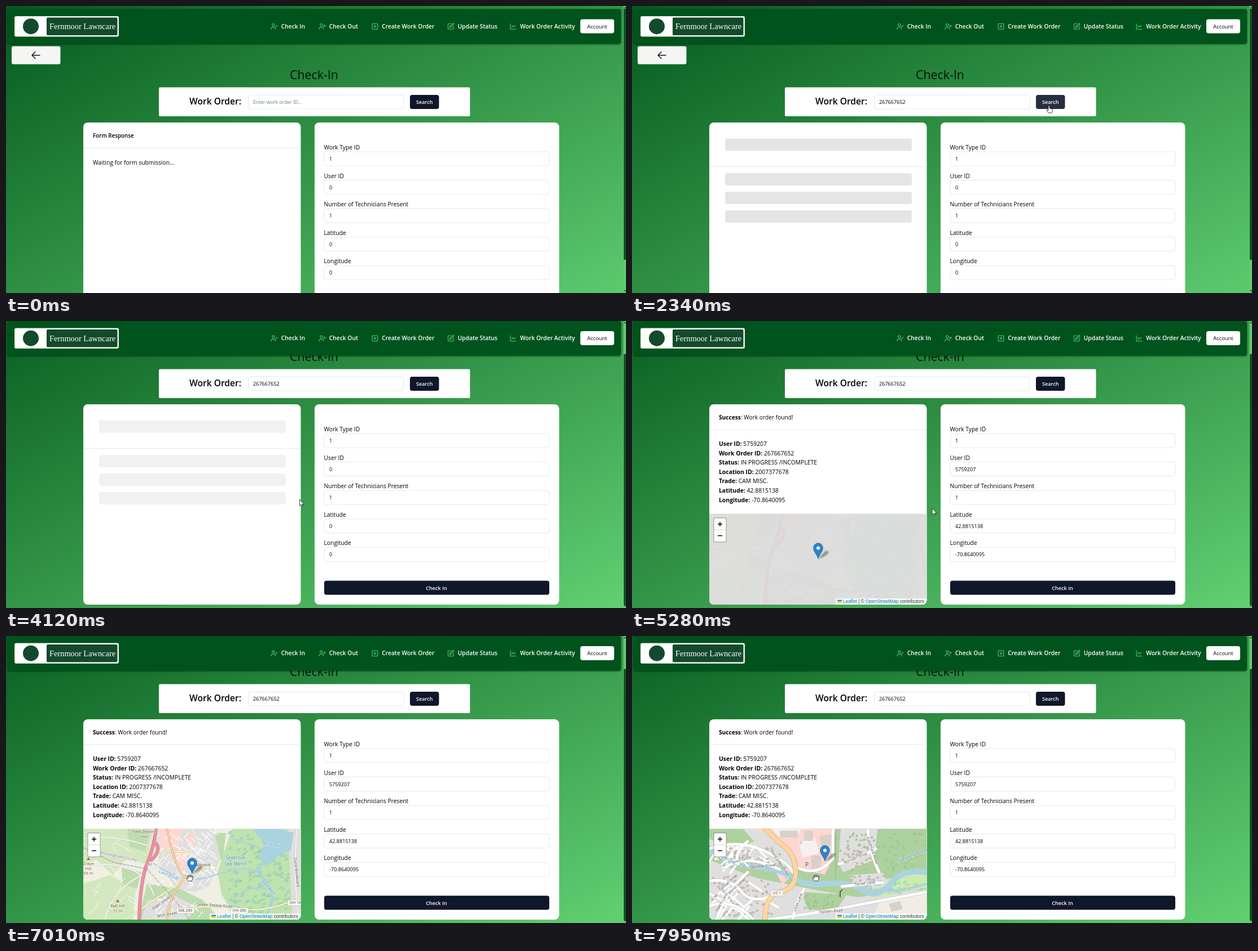
An HTML page for the animation above (8000 ms loop, 1099 px wide and 510 px high).

```html
<!DOCTYPE html>
<html lang="en">
<head>
<meta charset="utf-8">
<title>Check-In</title>
<style>
  html, body { margin: 0; width: 100%; height: 100%; overflow: hidden; background: #339548; }
  svg { display: block; font-family: "Open Sans", "Noto Sans", sans-serif; }
  text { white-space: pre; }
  .map text { text-anchor: middle; paint-order: stroke; stroke: #fff9; stroke-width: 1.6px; stroke-linejoin: round; }
  .cursor { stroke: #111; stroke-width: .8; stroke-linejoin: round; fill: #fff; }
</style>
</head>
<body>
<svg id="stage" width="1099" height="510"></svg>
<script>
const LOOP = 8000, ANCHOR = [326, 430], PIN = [4, -7.5];
const NAVY = '#0f172a', LINE = '#e2e8f0';

let seed = 11;
const rnd = () => (seed = seed * 16807 % 2147483647) / 2147483647;
const clamp = v => Math.max(0, Math.min(1, v));

// ---- drawing helpers -------------------------------------------------
const rect = (x, y, w, h, fill, r = 0, more = '') =>
  `<rect x="${x}" y="${y}" width="${w}" height="${h}" rx="${r}" fill="${fill}" ${more}/>`;
const text = (x, y, size, str, more = '') => `<text x="${x}" y="${y}" font-size="${size}" ${more}>${str}</text>`;
const area = (fill, ...ds) => ds.map(d => `<path d="${d}" fill="${fill}"/>`).join('');
const line = (stroke, width, d, more = '') =>
  `<path d="${d}" fill="none" stroke="${stroke}" stroke-width="${width}" stroke-linecap="round" stroke-linejoin="round" ${more}/>`;
const roads = (color, edge, width, ...ds) =>
  ds.map(d => line(edge, width + 1, d)).join('') + ds.map(d => line(color, width, d)).join('');
const group = (id, body, more = '') => `<g id="${id}" ${more}>${body}</g>`;
const scatter = (n, x, y, w, h, make) =>
  Array.from({ length: n }, () => make((x + rnd() * w).toFixed(1), (y + rnd() * h).toFixed(1))).join('');
const label = (x, y, str, fill = '#555', turn = 0, size = 7, more = '') =>
  text(x, y, size, str, `fill="${fill}" transform="rotate(${turn} ${x} ${y})" ${more}`);
const water = (x, y, str, turn = 0, size = 8.5) => label(x, y, str, '#3f86b4', turn, size, 'font-style="italic"');
const shield = (x, y, str) =>
  rect(x - str.length * 2.3 - 2, y - 7, str.length * 4.6 + 4, 10, '#fffc', 2, 'stroke="#bbb" stroke-width=".6"') +
  label(x, y, str, '#444');
const input = (x, y, w) => rect(x, y, w, 25, '#fff', 4, `stroke="${LINE}"`);
const button = (x, y, w, str, cx, id) =>
  rect(x, y, w, 25, NAVY, 4, `id="${id}"`) +
  text(cx, y + 16, 9.1, str, 'fill="#fff" font-weight="600" text-anchor="middle"');

// ---- navigation ------------------------------------------------------
const USER = 'M16 21v-2a4 4 0 0 0-4-4H6a4 4 0 0 0-4 4v2M13 7a4 4 0 1 1-8 0 4 4 0 0 1 8 0';
const BOX = 'M5 3H19a2 2 0 0 1 2 2V19a2 2 0 0 1-2 2H5a2 2 0 0 1-2-2V5a2 2 0 0 1 2-2M8 12h8M12 8v8';
const EDIT = 'M12 3H5a2 2 0 0 0-2 2v14a2 2 0 0 0 2 2h14a2 2 0 0 0 2-2v-7M18.4 2.6a2 2 0 0 1 3 3L12 15l-4 1 1-4Z';
const items = [
  [469, 'Check In', USER + 'M16 11l2 2 4-4'],
  [554, 'Check Out', USER + 'M17 8l5 5M22 8l-5 5'],
  [647.5, 'Create Work Order', BOX],
  [782, 'Update Status', EDIT],
  [892.5, 'Work Order Activity', 'M3 3v18h18M19 9l-5 5-4-4-3 3']
];
const nav =
  rect(3, 0, 1087, 61.5, '#00521a', 4, 'filter="url(#shade)"') +
  rect(15.5, 13, 184, 35.5, '#fff', 2, 'stroke="#e8e8e0"') +
  rect(72, 15, 125.5, 31.5, '#134a2c', 2) +
  '<circle cx="44" cy="30.7" r="14" fill="#134a2c"/>' +
  text(77, 35.5, 14.4, 'Fernmoor Lawncare', 'fill="#fff" font-family="Liberation Serif, serif"') +
  items.map(([x, str, d]) =>
    line('#5fd07a', 1.9, d, `transform="translate(${x} 24.3) scale(.54)"`) +
    text(x + 18.7, 34.4, 10.3, str, 'fill="#fff" font-weight="600"')).join('') +
  rect(1018, 18, 60, 25, '#fff', 4) +
  text(1048, 34, 9.4, 'Account', 'font-weight="500" text-anchor="middle"');

// ---- map, one layer per zoom level -----------------------------------
const hill = (x, y, a, b) =>
  area('#b5651d', `M${x} ${y - 14}l3 5h-6Z`) + label(x, y, a, '#7a4a2a') + label(x, y + 8.5, b, '#7a4a2a');
const house = (x, y) => rect(x, y, 4.5, 3.6, '#c6b9ad', 0, `transform="rotate(${(x * 7) % 50 - 25} ${x} ${y})"`);
const reed = (x, y) => line('#7fbfc4', .9, `M${x} ${y}h4m-6 2.5h5`);
const tree = (x, y) => area('#9cc58d', `M${x} ${y}l2.5 5h-5Z`);
// Side street at one of two crossing bearings
const lane = (len, width) => (x, y) => {
  const a = (rnd() < .5 ? .45 : 2.1) + rnd() * .4;
  return line('#fff', width, `M${x} ${y}l${(len * Math.cos(a)).toFixed(1)} ${(len * Math.sin(a)).toFixed(1)}`);
};

const far =
  rect(60, 300, 540, 260, '#efefe2') +
  area('#d3e8bf', 'M137 343H262L248 405 215 395 190 425 160 398 137 404Z', 'M137 440L185 425 230 450 225 504H137Z') +
  area('#bfdbb0', 'M215 343h42l-10 40-28-8Z', 'M250 440l60 10 40 20 30 34H235Z', 'M205 412l35 8-8 30-25-10Z', 'M350 350h40l-6 50-25-12Z') +
  area('#e0dfdf', 'M264 343H368L380 395 360 445 335 455 300 448 272 405Z', 'M500 343H522V504H508Z', 'M250 470l50-8 40 20-20 22h-80Z') +
  area('#ffd6d1', 'M270 343h42l-6 30-30 9Z', 'M298 378l22 4 5 28-18 4Z', 'M322 348l14 6-4 18-12-4Z') +
  area('#bfe3ad', 'M400 343H500L508 504H408L382 458 375 420 388 380Z') +
  scatter(170, 395, 346, 105, 155, reed) +
  area('#aad3df', 'M436 343H488L510 350 505 380 482 392 462 410 450 395 458 368Z') +
  line('#aad3df', 5, 'M462 400Q438 412 455 430T472 466 455 504') +
  line('#aad3df', 2.5, 'M262 404Q290 425 315 430T360 428 410 415 450 425M400 360Q430 368 455 380M410 460Q440 440 470 452') +
  scatter(95, 272, 343, 95, 98, lane(13, 1.2)) + scatter(25, 140, 350, 90, 150, lane(13, 1)) + scatter(22, 255, 455, 95, 40, lane(13, 1.2)) +
  roads('#fff', '#c9c4bc', 1.6, 'M137 412Q180 400 215 412T262 460', 'M175 504Q190 450 240 425T300 380', 'M137 360Q190 352 250 372', 'M330 343Q345 380 375 398', 'M515 343L512 420 518 504') +
  roads('#f7fabf', '#b9b98a', 2.2, 'M212 504Q260 470 310 437T372 405', 'M250 504Q300 486 340 482T420 485 522 465', 'M245 390Q290 378 330 385') +
  roads('#fcd6a4', '#c69a58', 2.6, 'M285 343Q294 385 304 408T317 427 304 448 285 504') +
  roads('#e892a2', '#d0507a', 5, 'M266 343Q262 375 250 405T236 504', 'M262 365Q278 378 258 398') +
  line('#a07ab0', 1, 'M137 376L190 402 250 414 300 470 325 504', 'stroke-dasharray="5 2"') +
  label(246, 350, 'New Zealand', '#7a4a2a') + label(246, 359, 'Hill', '#7a4a2a') +
  hill(146, 407, 'Grape', 'Hill') + label(146, 424, '69 m', '#7a4a2a') + hill(198, 482, 'Batt Hill', '51 m') +
  label(200, 394, 'Rockingham County', '#8d67a0', 12) + label(255, 408, '9d', '#666') +
  label(345, 409, 'Seabrook', '#444', 0, 8) + water(407, 397, 'Seabrook') + water(407, 408, 'Salt Marsh') +
  water(287, 427, 'Cains Brook', 22, 7) + water(470, 373, 'Mill Creek', 10, 7) + water(464, 449, 'Reed Water', 45, 7) +
  label(277, 476, 'Elder Street', '#444', -35) + label(286, 497, 'Wick Street', '#444', -10) +
  label(370, 481, 'Green Pebble Road', '#444', 4) + label(513, 420, 'Dune Boulevard', '#444', 84) +
  shield(318, 490, 'MA 286') + shield(414, 490, 'NH 286') + shield(513, 476, 'NH 1A');

const mid =
  rect(60, 300, 540, 260, '#e3e2df') +
  area('#d3e8bf', 'M137 343h40l-22 60-18 5Z', 'M185 440l70-5 20 30-50 39H165Z', 'M395 370h65l10 45-50 20-25-20Z') +
  area('#b9daab', 'M200 343h40l10 40-30 14-34-18Z', 'M215 403Q290 418 380 425L462 420 450 442 330 446 240 428Z', 'M310 470l60-8 15 42h-85Z', 'M425 343h40l-5 45-28-10Z', 'M137 440l35-15-15 60-20 10Z') +
  area('#f0eee8', 'M400 440L522 400V504H395Z') +
  area('#f6f5f2', 'M450 415l40-12 20 20-30 30-35-5Z') +
  area('#ffd6d1', 'M252 343h52l22 32-10 40-32-28Z', 'M137 380l14-4 4 26-18 8Z') +
  area('#bfe3ad', 'M466 343H522V400L488 408 460 420Z') + scatter(90, 464, 343, 60, 65, reed) +
  area('#d9d0c9', 'M283 362h14v12h-14Z', 'M312 348h20v14h-20Z', 'M319 408h9v15h-9Z', 'M256 350h10v18h-10Z') +
  line('#aad3df', 5, 'M150 365Q190 385 231 408T308 431 363 442 424 428 522 402') +
  line('#aad3df', 2.5, 'M522 370Q495 385 480 410T440 430') +
  scatter(60, 200, 345, 230, 60, lane(24, 1.8)) + scatter(30, 137, 405, 110, 90, lane(24, 1.8)) + scatter(26, 270, 445, 130, 50, lane(24, 1.8)) +
  scatter(75, 140, 390, 120, 110, house) + scatter(90, 325, 346, 95, 75, house) + scatter(45, 290, 440, 90, 58, house) +
  roads('#fff', '#bfbab2', 3, 'M205 343Q240 380 285 392', 'M310 343Q345 365 400 372T440 343', 'M345 395Q385 385 415 343', 'M320 410Q365 398 402 420L410 380', 'M137 425Q190 405 225 440T260 504', 'M190 500Q220 470 300 455', 'M310 455Q350 470 400 455T522 470', 'M345 504Q360 470 350 445', 'M225 398Q250 385 270 397', 'M365 343L378 385', 'M420 440L425 504') +
  roads('#f7fabf', '#b9b98a', 3.5, 'M262 504Q285 470 294 442', 'M308 425Q355 360 420 350T522 343') +
  roads('#fcd6a4', '#c69a58', 4.5, 'M262 343Q270 368 282 386T308 425 294 442 272 504') +
  roads('#e892a2', '#d0507a', 5, 'M186 343Q184 390 168 430T143 504', 'M194 343Q191 392 176 432T152 504') +
  line('#a07ab0', 1.2, 'M137 392L175 425 250 460 300 504', 'stroke-dasharray="7 3"') +
  label(364, 383, 'Seabrook', '#444', 0, 8.5) + water(488, 365, 'Seabrook', 0, 9.5) + water(488, 377, 'Salt Marsh', 0, 9.5) +
  water(245, 418, 'Cains Brook', 24, 8) + label(182, 431, 'Massachusetts', '#8d67a0', 38, 7.5) +
  label(262, 474, 'New Hampshire', '#8d67a0', 38, 7.5) +
  label(208, 460, 'Conservation', '#3d7a33', 0, 6.8, 'font-style="italic"') + label(202, 468, 'Land', '#3d7a33', 0, 6.8, 'font-style="italic"');

const near =
  rect(60, 300, 540, 260, '#e0dfdf') +
  area('#add19e', 'M362 343H522V425Q450 440 390 438L340 425Z', 'M137 343h60l20 22-30 10-50-14Z', 'M137 372Q200 402 290 412L400 430 522 412V450L400 464 330 452 220 430 137 398Z', 'M305 455l75 5-20 30-50-5Z') +
  area('#cdebb0', 'M410 440l112-22v30l-95 18Z') +
  area('#e0dfdf', 'M370 343h65l-6 55-55 22-8-18Z', 'M385 425l60-4 10 22-60 8Z') +
  area('#ffd6d1', 'M212 343H358L356 395 342 424 296 415 288 388 250 353Z', 'M255 420l25-10 5 14-18 18Z') +
  area('#f0ece6', 'M440 470L522 452V504H425Z') +
  area('#f4f1ee', 'M296 366l28-8 8 28-30 8Z', 'M250 343h50l-6 12-34 2Z') +
  area('#d9d0c9', 'M318 390h17v29h-17Z', 'M332 356l22-4 4 20-22 4Z', 'M262 346h32v12h-32Z', 'M305 346h16v18h-16Z', 'M455 476l20-5 5 14-20 5Z', 'M268 425l9-5 5 8-10 5Z') +
  scatter(65, 365, 346, 155, 68, tree) + scatter(30, 305, 455, 65, 28, tree) + scatter(45, 410, 435, 105, 20, reed) +
  line('#aad3df', 10, 'M120 374Q165 402 220 410T290 431 345 440 410 452 460 438 540 424') +
  line('#aad3df', 4, 'M420 450Q460 460 522 440') +
  scatter(16, 137, 370, 90, 25, lane(34, 3.5)) + scatter(18, 137, 430, 95, 60, lane(34, 3.5)) +
  scatter(60, 150, 375, 110, 35, house) + scatter(75, 140, 425, 105, 72, house) + scatter(30, 375, 350, 50, 60, house) + scatter(18, 385, 425, 60, 20, house) +
  roads('#fff', '#b9b4ac', 5, 'M137 378Q190 360 235 382T285 420', 'M165 412Q200 385 262 415', 'M205 365Q180 385 188 405', 'M137 435Q175 430 195 455T262 455', 'M150 504Q165 455 205 420', 'M137 480Q180 465 215 504', 'M285 504Q290 470 305 450', 'M240 504Q330 492 380 482T522 455', 'M418 343Q420 380 438 420', 'M367 405Q395 400 432 378', 'M372 445L445 438', 'M290 410Q330 430 356 395V343') +
  roads('#fcd6a4', '#c69a58', 8, 'M226 332Q250 358 270 374T290 420 262 455 236 510') +
  line('#888', .8, 'M361 343V430', 'stroke-dasharray="4 2"') + line('#333', 1.4, 'M373 451l-4 3v9') +
  label(310, 410, 'P', '#2f6fb5', 0, 10, 'font-weight="600"') + label(300, 371, 'P', '#7fa8d0', 0, 9) +
  label(195, 400, 'Oren Circle', '#444', -18) + label(232, 411, 'Quillow Drive', '#444', -4) +
  label(260, 404, 'Pond Edge Drive', '#444', 56) + label(172, 440, 'Tamsel Drive', '#444', -42) +
  label(186, 447, 'Verrin Lane', '#444', -42) + label(161, 474, 'Hatch Lane', '#444', -60) +
  label(296, 474, 'Lilow Lane', '#444', -68) + label(424, 382, 'Fieldmark Road', '#444', 70) +
  label(397, 397, 'Norvian Drive', '#444', -22) + label(413, 442, 'Tarvel Lane', '#444', -6) +
  label(353, 491, 'Halden Road', '#444', -5) + shield(257, 459, 'US 1') +
  water(163, 396, 'Cains Brook', 26, 8) + water(499, 392, 'Shepherd Brook', -22, 8);

const blue = str => `<tspan fill="#0078a8">${str}</tspan>`;
const map = `<g class="map" clip-path="url(#frame)">${rect(137, 342, 386, 163, '#ddd')}` +
  group('tiles', [far, mid, near].map((body, i) => group('level' + i, body)).join('')) +
  group('pin', '<path d="M0 0L12-13Q20-16 18-10Q14-4 0 0Z" fill="#0005" filter="url(#soft)"/>' +
    '<path d="M0 0C-2-8-8.3-12-8.3-19.5A8.3 8.3 0 0 1 8.3-19.5C8.3-12 2-8 0 0Z" fill="#2b83c9" stroke="#2366a0" stroke-width=".8"/>' +
    '<circle cy="-19" r="3" fill="#fff"/>') +
  rect(145, 350, 22, 42.5, '#fff', 2.5, 'stroke="#0004" stroke-width="1.4"') +
  line('#ccc', .8, 'M145.5 371H166.5') + line('#000', 1.5, 'M152.5 361h7m-3.5-3.5v7M152.5 381.5h7') +
  rect(361, 493, 162, 12, '#fffc') + rect(364, 495.5, 8, 2.7, '#4c7be1') + rect(364, 498.2, 8, 2.7, '#ffd500') +
  '</g>' +
  text(374, 501, 8.27, `${blue('Leaflet')} <tspan fill="#333">| ©</tspan> ${blue('OpenStreetMap')} <tspan fill="#333">contributors</tspan>`,
    'font-family="Liberation Sans, Arial, sans-serif"');

// ---- page ------------------------------------------------------------
const names = ['Work Type ID', 'User ID', 'Number of Technicians Present', 'Latitude', 'Longitude'];
const rowY = i => 259 + i * 50.6;
const values = list => list.map((v, i) => text(573, rowY(i) + 16, 9.1, v)).join('');
const details = [['User ID', '5759207'], ['Work Order ID', '267667652'], ['Status', 'IN PROGRESS /INCOMPLETE'],
  ['Location ID', '2007377678'], ['Trade', 'CAM MISC.'], ['Latitude', '42.8815138'], ['Longitude', '-70.8640095']];
const bold = str => `<tspan font-weight="700">${str}</tspan>`;
const divider = y => line(LINE, 1, `M137.5 ${y}H522`);
const bone = y => `<rect x="165" y="${y}" width="331" height="22" rx="4"/>`;

const page =
  rect(0, 0, 1099, 569, 'url(#bg)') +
  rect(10, 71.5, 86.5, 32, '#f5f5f4', 3) + line('#111', 1.4, 'M60 87.5H46M52 81.5L46 87.5 52 93.5') +
  text(546, 130, 21.4, 'Check-In', 'fill="#06120a" text-anchor="middle"') +
  rect(271, 144.5, 551.5, 51.5, '#fff', 2) +
  text(325, 175, 15.6, 'Work Order:', 'font-weight="600"') + input(429.5, 158, 275.5) +
  group('hint', text(438, 174, 8.7, 'Enter work order ID...', 'fill="#64856f"')) +
  group('query', text(438, 174, 9.1, '267667652')) +
  button(716, 158, 51.5, 'Search', 741.7, 'search') +
  rect(137, 207, 385.5, 356, '#fff', 8) + rect(547, 207, 433.5, 356, '#fff', 8) +
  names.map((name, i) => text(563.5, rowY(i) - 4, 10.3, name) + input(564, rowY(i), 399)).join('') +
  group('before', values([1, 0, 1, 0, 0])) +
  group('after', values([1, 5759207, 1, 42.8815138, -70.8640095])) +
  button(564, 520.5, 399, 'Check In', 763, 'submit') +
  group('waiting', text(154, 234, 9.8, 'Form Response', 'font-weight="600"') + divider(252.5) +
    text(154, 281.5, 10.3, 'Waiting for form submission...')) +
  group('skeleton', divider(285.5) + group('bones', [235.5, 297, 330, 363].map(bone).join(''))) +
  group('result', text(154, 234, 10.2, bold('Success') + ': Work order found!') + divider(252) +
    details.map(([k, v], i) => text(154, 281 + i * 16.6, 10.4, bold(k + ':') + ' ' + v)).join('') +
    `<g transform="translate(0 59)">${map}</g>`);

const cursors = {
  arrow: 'M0 0V11.3L2.6 8.9 4.3 12.6 6 11.9 4.4 8.3H8Z',
  beam: 'M-3-7.5H3M0-7.5V7.5M-3 7.5H3',
  hand: 'M-1 1.2Q0-.6 1.2 1.2V5.5L2.5 5.6 4 6 5.4 6.6 6.2 7.5V10.5L4.8 13.5H-.8L-4 8.8Q-4 7.4-2.6 8L-1 9.2Z',
  grab: 'M-2.5 5.5L-6 .6Q-6-1-4.4-.4L-3.2 .8-4.4-3.6Q-4-5-2.8-4.2L-1.6-1.4-1.5-5Q-.6-6.2 .2-5L.6-1.6 1.8-4.8Q3-5.6 3.4-4.2L3-1 4.4-3.2Q5.8-3.4 5.6-2L4.6 2.2 3.4 5.5Z'
};

document.getElementById('stage').innerHTML = `<defs>
  <linearGradient id="bg" x1="0" y1="0" x2="1" y2="1"><stop stop-color="#045a1e"/><stop offset="1" stop-color="#62d072"/></linearGradient>
  <clipPath id="frame"><path d="M137 342.5H522.5V496a8 8 0 0 1-8 8H145a8 8 0 0 1-8-8Z"/></clipPath>
  <filter id="shade"><feDropShadow dx="0" dy="1" stdDeviation="1.5" flood-opacity=".6"/></filter>
  <filter id="soft"><feGaussianBlur stdDeviation="1"/></filter></defs>` +
  group('page', page) + group('nav', nav) +
  rect(1094.5, 0, 4.5, 510, '#5fcc6f') + rect(1095, 0, 4, 446, '#0b5220', 0, 'id="thumb"') +
  area('#0b3d18', 'M1095.5 4l1.8-2.5 1.8 2.5Z', 'M1095.5 505l1.8 2.5 1.8-2.5Z') +
  '<path id="cursor" class="cursor"/>';

// ---- motion ----------------------------------------------------------
const $ = id => document.getElementById(id);
const show = (id, on) => $(id).setAttribute('display', on ? 'inline' : 'none');
const place = (id, x, y) => $(id).setAttribute('transform', `translate(${x} ${y})`);

// Fraction of n equal ticks passed, the first at a and the last at b
const ticks = (t, a, b, n) => t < a ? 0 : Math.min(n, Math.floor((t - a) / ((b - a) / (n - 1) || 1)) + 1) / n;
const smooth = p => p * p * (3 - 2 * p);
const easeOut = p => 1 - (1 - clamp(p)) ** 3;

// start, end, ticks, target x, target y
const moves = [[320, 990, 10, 568, 171], [1460, 2000, 9, 739, 176.5], [2540, 2870, 6, 519.5, 316],
  [4120, 4460, 6, 531, 332], [4600, 4600, 1, 532, 333], [5940, 6550, 10, 402, 437], [6880, 7010, 3, 326, 430]];

function pointer(t) {
  let x = 846, y = 419;
  for (const [a, b, n, tx, ty] of moves) {
    const p = smooth(ticks(t, a, b, n));
    x += (tx - x) * p;
    y += (ty - y) * p;
  }
  return [x, y];
}

function draw(t) {
  const scroll = t < 3180 ? 0 : t < 3250 ? 8 : t < 3320 ? 36 : 59;
  const loaded = t >= 5280, [x, y] = pointer(t), docY = y + scroll;
  const inSearchRow = docY > 158 && docY < 183;
  const overButton = inSearchRow && x > 716 && x < 767;
  const kind = overButton ? 'hand' : inSearchRow && x > 429 && x < 705 ? 'beam'
    : loaded && x < 522 && y > 343 ? 'grab' : 'arrow';

  place('page', 0, -scroll);
  place('nav', 0, Math.max(0, 5.5 - scroll));
  $('thumb').setAttribute('y', 5 + scroll * .91);
  show('hint', t < 1460);
  show('query', t >= 1460);
  show('waiting', t < 2270);
  show('skeleton', t >= 2270 && !loaded);
  show('result', loaded);
  show('before', !loaded);
  show('after', loaded);
  $('bones').setAttribute('fill', t < 3180 ? '#e5e5e7' : '#f1f1f1');
  $('search').setAttribute('fill', overButton ? '#272e3f' : NAVY);

  const z = t < 7430 ? 0 : 7430 + 65 * Math.floor((t - 7430) / 65);
  const scale = (1 + easeOut((z - 7380) / 250)) * (1 + easeOut((z - 7700) / 250));
  [1, clamp((z - 7540) / 80), clamp((z - 7860) / 80)].forEach((alpha, i) => {
    const level = $('level' + i), [ax, ay] = ANCHOR;
    level.setAttribute('transform', `translate(${ax} ${ay}) scale(${scale / 2 ** i}) translate(${-ax} ${-ay})`);
    level.setAttribute('opacity', alpha);
    show('level' + i, alpha > 0);
  });
  $('tiles').setAttribute('opacity', [.08, .08, .4, .75, 1][ticks(t, 5280, 5480, 4) * 4]);
  place('pin', ANCHOR[0] + PIN[0] * scale, ANCHOR[1] + PIN[1] * scale);

  show('cursor', t >= 320);
  $('cursor').setAttribute('d', cursors[kind]);
  place('cursor', x, y);
}

const start = performance.now();
(function tick() {
  draw((performance.now() - start) % LOOP);
  requestAnimationFrame(tick);
})();
</script>
</body>
</html>
```
